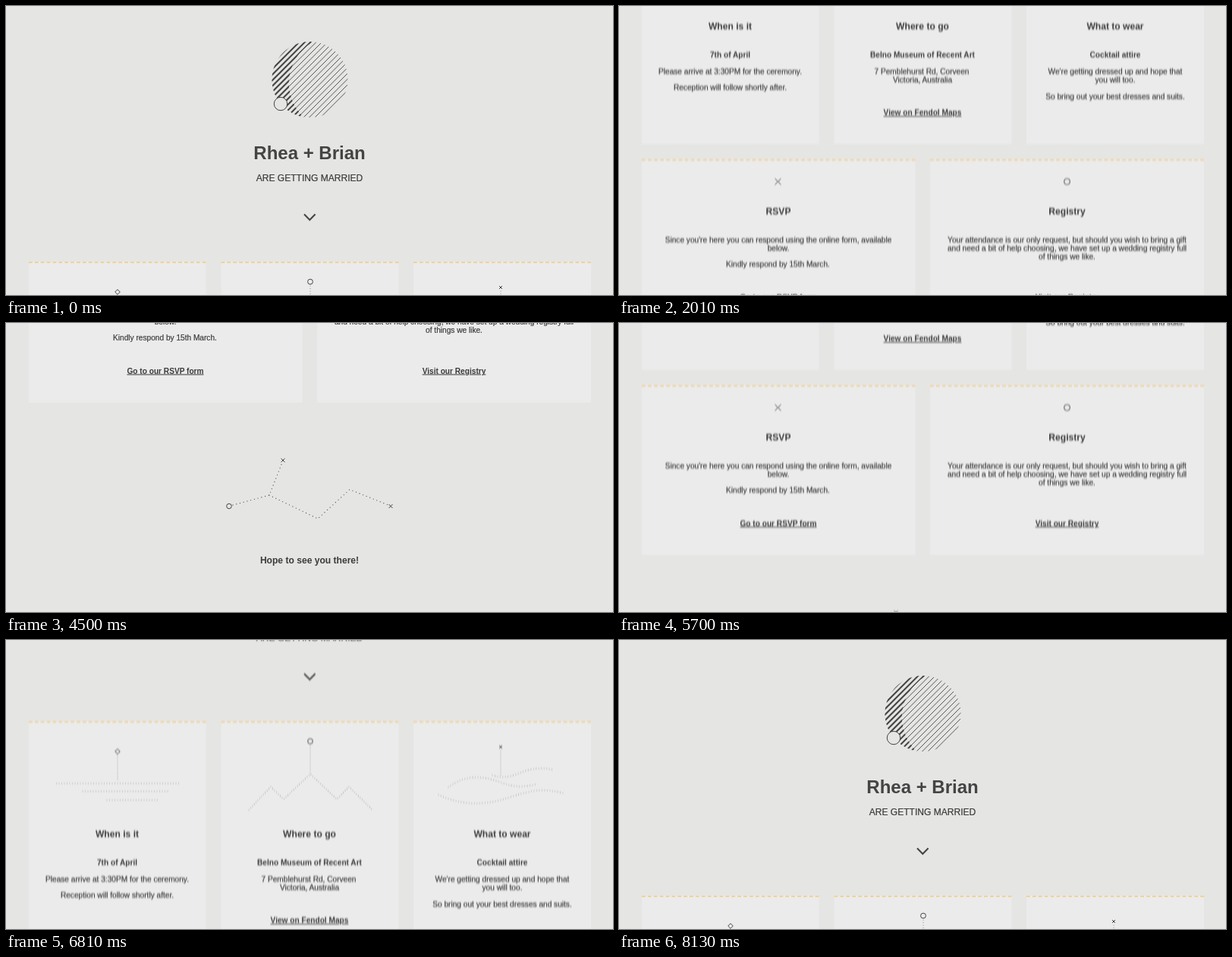
An HTML page for the animation above (9 s loop, 800 px wide and 381 px high).

```html
<!DOCTYPE html>
<html lang="en">
<head>
<meta charset="utf-8">
<title>Wedding page scroll</title>
<style>
  html, body { margin: 0; width: 100%; height: 100%; overflow: hidden; background: #e5e5e3; }
  svg { display: block; width: 800px; height: 381px; }
  text {
    font: 10.14px "Liberation Sans", Arial, sans-serif; text-anchor: middle;
    fill: #3b3b3b; stroke: #3b3b3b; stroke-width: .2;
  }
  .title { font-size: 24px; font-weight: bold; fill: #444; }
  .sub { font-size: 12.05px; }
  .head { font-size: 12.08px; font-weight: bold; }
  .bold { font-weight: bold; }
  .link { font-weight: bold; text-decoration: underline; }
  .title, .head, .bold, .link { stroke: none; }
  .card { fill: #ebebeb; }
  .edge { stroke: #f1ca82; stroke-width: 1.7; }
  .line { fill: none; stroke: #444; }
  .dots { fill: none; stroke: #777; stroke-width: 1.1; stroke-linecap: round; stroke-dasharray: 0 3.5; }
  .stars { stroke: #555; stroke-width: 1.3; stroke-dasharray: 0 4.9; }
</style>
</head>
<body>
<svg viewBox="0 0 800 381">
  <defs>
    <filter id="smear" filterUnits="userSpaceOnUse" x="0" y="0" width="800" height="1162" color-interpolation-filters="sRGB">
      <feGaussianBlur id="blur" stdDeviation="0 0"/>
    </filter>
    <clipPath id="disc"><circle cx="400.5" cy="97" r="50"/></clipPath>
    <clipPath id="crescent"><path d="M412 44H340V150H396A62 62 0 0 1 412 44Z"/></clipPath>
  </defs>
  <g id="page">
    <g id="sheet">
      <rect width="800" height="1162" fill="#e5e5e3"/>

      <g clip-path="url(#disc)">
        <path id="thin" class="line" stroke-width=".9"/>
        <g clip-path="url(#crescent)"><path id="thick" class="line" stroke-width="2"/></g>
      </g>
      <circle class="line" cx="362" cy="129" r="8.7" style="fill:#e5e5e3"/>
      <path class="line" d="M393 274.5l7.3 7.5 7.3-7.5" stroke-width="2"/>

      <g id="cards"></g>

      <path class="line" d="M147 373.7l3.3 3.3-3.3 3.3-3.3-3.3z"/>
      <path class="dots" d="M147 382V417M66.5 419H228M101 429.5H214M133 441H201"/>

      <circle class="line" cx="401" cy="363.5" r="3.4"/>
      <path class="dots" d="M401 369V405M320 454L349 423.5 366 440 401 406.5 436 440 452 423.5 483 454"/>

      <path class="line" d="M650 369l4 4m0-4l-4 4"/>
      <path class="dots" d="M652 376V411M583 424C605 408 625 408 650 417S685 423 700 420M641 408C662 416 675 404 690 401S712 399 720 401M570 434C600 448 630 449 665 437S715 427 735 432"/>

      <path class="line" d="M205.5 686.5l8 8m0-8l-8 8"/>
      <circle class="line" cx="590.5" cy="690.5" r="4"/>

      <path class="dots stars" d="M299 1020L347 1007 364 964M347 1007L411 1038 453 999.5 504 1020"/>
      <circle class="line" cx="294" cy="1021.5" r="3.3"/>
      <path class="line" d="M362.5 958.5l5 5m0-5l-5 5M504.5 1019l5 5m0-5l-5 5"/>

      <g id="words"></g>
    </g>
  </g>
</svg>
<script>
  const el = id => document.getElementById(id);

  // Diagonal hatching of the moon
  let hatch = "";
  for (let k = -5; k <= 14; k++) {
    const c = 464 + k * 7.5;
    hatch += `M340 ${c - 340}L460 ${c - 460}`;
  }
  el("thin").setAttribute("d", hatch);
  el("thick").setAttribute("d", hatch);

  // Dashed edge that starts and ends with a full dash
  function edge(x, y, w) {
    const dash = 4.8, count = Math.round((w + 3.2) / 8);
    const gap = (w - count * dash) / (count - 1);
    return `<path class="edge" d="M${x} ${y}h${w}" stroke-dasharray="${dash} ${gap}"/>`;
  }
  const card = (x, y, w, h) =>
    `<rect class="card" x="${x}" y="${y}" width="${w}" height="${h}"/>` + edge(x, y + 1, w);
  el("cards").innerHTML =
    card(30, 337, 233.5, 304) + card(283.5, 337, 234, 304) + card(537, 337, 234, 304) +
    card(30, 661, 360.5, 224) + card(410, 661, 361, 224);

  const words = [
    [400, 202, "Rhea + Brian", "title"],
    [400, 230.7, "ARE GETTING MARRIED", "sub"],

    [146.5, 490.3, "When is it", "head"],
    [146.5, 526.7, "7th of April", "bold"],
    [146.5, 548.5, "Please arrive at 3:30PM for the ceremony."],
    [146.5, 570, "Reception will follow shortly after."],

    [400, 490.3, "Where to go", "head"],
    [400, 526.7, "Belno Museum of Recent Art", "bold"],
    [399, 548.5, "7 Pemblehurst Rd, Corveen"],
    [400, 560, "Victoria, Australia"],
    [400, 603, "View on Fendol Maps", "link"],

    [654, 490.3, "What to wear", "head"],
    [654, 526.7, "Cocktail attire", "bold"],
    [654, 548.5, "We're getting dressed up and hope that"],
    [654, 560, "you will too."],
    [654, 581.5, "So bring out your best dresses and suits."],

    [210, 734, "RSVP", "head"],
    [210, 770.5, "Since you're here you can respond using the online form, available"],
    [210, 782, "below."],
    [209.5, 803.3, "Kindly respond by 15th March."],
    [210, 846.5, "Go to our RSVP form", "link"],

    [590.5, 734, "Registry", "head"],
    [590.5, 770.5, "Your attendance is our only request, but should you wish to bring a gift"],
    [590.5, 782, "and need a bit of help choosing, we have set up a wedding registry full"],
    [590.5, 793.3, "of things we like."],
    [590.5, 846.5, "Visit our Registry", "link"],

    [400, 1097, "Hope to see you there!", "head"]
  ];
  el("words").innerHTML = words
    .map(([x, y, s, c = ""]) => `<text class="${c}" x="${x}" y="${y}">${s}</text>`)
    .join("");

  const LOOP = 9000, STEP = 30, DEPTH = 781;
  const phase = (t, start, length) => Math.PI * Math.min(1, Math.max(0, (t - start) / length));
  const swing = a => (1 - Math.cos(a)) / 2;

  function draw() {
    const t = Math.floor(performance.now() % LOOP / STEP) * STEP;
    const down = phase(t, -47, 3699), up = phase(t, 4423, 3760);
    const y = Math.round(DEPTH * (swing(down) - swing(up)));
    const moving = y > 0 && y < DEPTH;
    // Vertical smear grows with the scroll speed
    const smear = Math.sin(down) + Math.sin(up);
    el("page").setAttribute("transform", `translate(0 ${-y})`);
    el("blur").setAttribute("stdDeviation", `0 ${smear.toFixed(2)}`);
    if (moving) el("sheet").setAttribute("filter", "url(#smear)");
    else el("sheet").removeAttribute("filter");
    requestAnimationFrame(draw);
  }
  draw();
</script>
</body>
</html>
```
